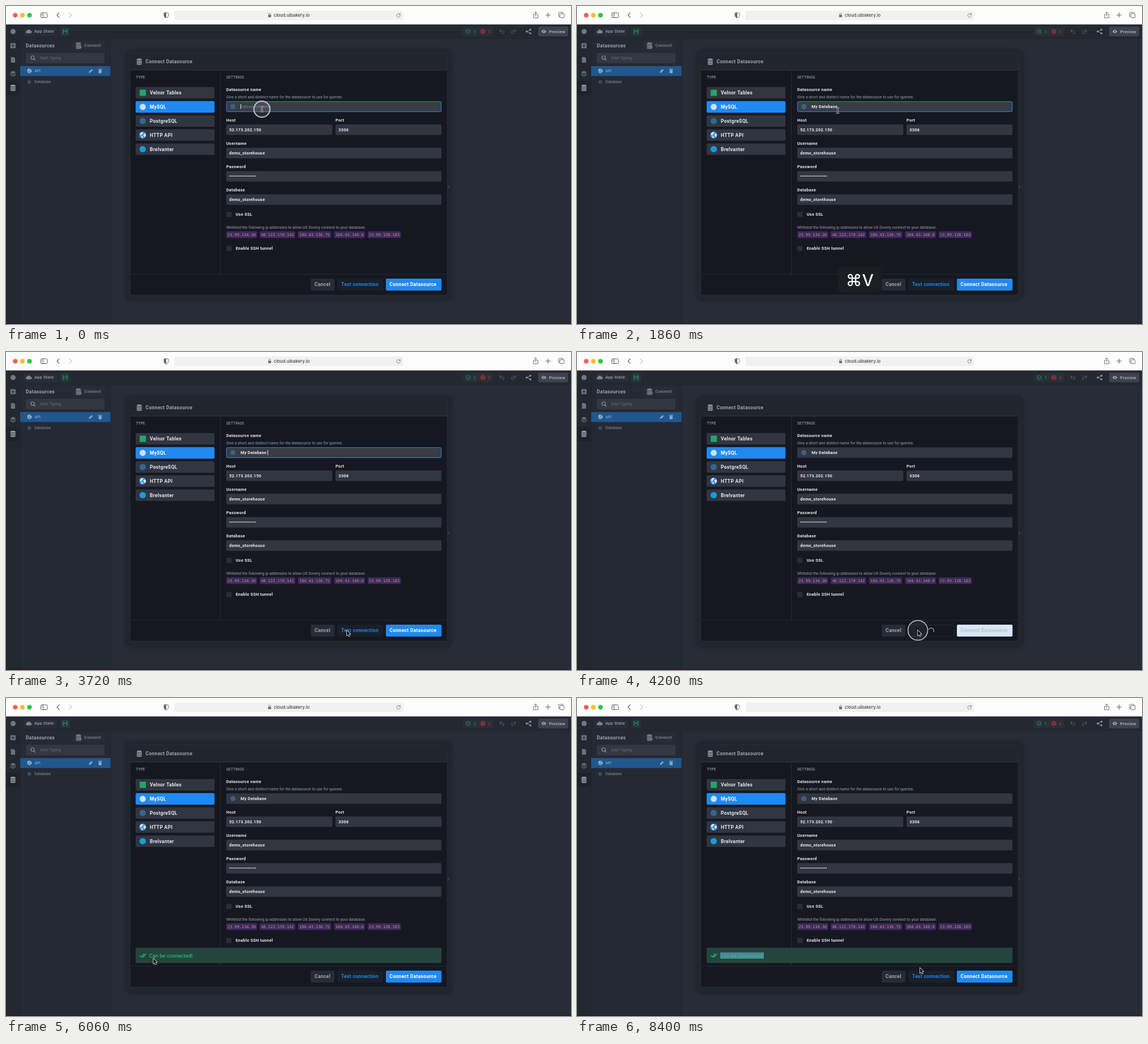
Animation, 998 px wide and 561 px high, one loop 8.43 s. Source, as an HTML page with a canvas:

```html
<!DOCTYPE html>
<html lang="en">
<head>
<meta charset="utf-8">
<title>Connect Datasource</title>
<style>
html, body { margin: 0; width: 100%; height: 100%; overflow: hidden; background: #262a34; }
canvas { display: block; width: 998px; height: 561px; }
</style>
</head>
<body>
<canvas id="stage"></canvas>
<script>
const W = 998, H = 561, LOOP = 8430;
const canvas = document.getElementById('stage');
const ctx = canvas.getContext('2d');
const dpr = window.devicePixelRatio || 1;
canvas.width = W * dpr;
canvas.height = H * dpr;

const UI = 'Roboto, sans-serif', MONO = '"DejaVu Sans Mono", monospace', SANS = 'Inter, sans-serif';
const BLUE = '#2089f3', FIELD = '#323641', WHITE = '#f0f2f5';

// event times in ms
const PASTE = 1300, KEY_OUT = 2350, BLUR = 3950, LOAD = 4100, DONE = 5000;
const DRAG = 6250, DROP = 6940;
const CLICKS = [[-200, 60], [BLUR, LOAD], [DRAG, DROP]];
const PATH = [
  [0, 452, 182], [600, 452, 182], [1300, 459, 184], [1860, 460.5, 184.5], [2150, 460.5, 184.5],
  [2850, 514.3, 409], [3500, 602, 491], [5000, 602, 491], [5850, 260.3, 459.5], [6060, 260.3, 459.5],
  [DRAG, 253, 454], [6800, 347.5, 453.5], [7050, 347.5, 453.5], [8150, 605.7, 476], [LOOP, 605.7, 476]
];

const clamp = v => Math.max(0, Math.min(1, v));
const smooth = v => v * v * (3 - 2 * v);

function box(x, y, w, h, r, fill, stroke, lw = 1) {
  ctx.beginPath();
  ctx.roundRect(x, y, w, h, r);
  if (fill) { ctx.fillStyle = fill; ctx.fill(); }
  if (stroke) { ctx.strokeStyle = stroke; ctx.lineWidth = lw; ctx.stroke(); }
}

function dot(x, y, r, fill, stroke, lw = 1) {
  ctx.beginPath();
  ctx.arc(x, y, r, 0, Math.PI * 2);
  if (fill) { ctx.fillStyle = fill; ctx.fill(); }
  if (stroke) { ctx.strokeStyle = stroke; ctx.lineWidth = lw; ctx.stroke(); }
}

// y is the middle of the capitals
function text(s, x, y, size, color, weight = 400, gap = 0, font = UI) {
  ctx.font = `${weight} ${size}px ${font}`;
  ctx.letterSpacing = gap + 'px';
  ctx.fillStyle = color;
  ctx.fillText(s, x, y + size * 0.355);
}
const small = (s, x, y, color) => text(s, x, y, 6.83, color);
const label = (s, x, y, color = '#e6e8ec') => text(s, x, y, 7.4, color, 700, 0.26);
const large = (s, x, y, color) => text(s, x, y, 8.53, color, 700, 0.3);

function icon(d, x, y, color, lw = 0) {
  const p = new Path2D(d);
  ctx.save();
  ctx.translate(x, y);
  ctx.lineCap = ctx.lineJoin = 'round';
  if (lw) { ctx.strokeStyle = color; ctx.lineWidth = lw; ctx.stroke(p); }
  else { ctx.fillStyle = color; ctx.fill(p); }
  ctx.restore();
}

const CLOUD = 'M-3 3.2a2.2 2.2 0 0 1-.2-4.4a3.2 3.2 0 0 1 6-.4a2.4 2.4 0 0 1 .4 4.8z';
const band = y => `M-4.5 ${y}a4.5 1.5 0 0 0 9 0v1.9a4.5 1.5 0 0 1-9 0z`;
const STACK = 'M-4.5-3.6a4.5 1.6 0 0 1 9 0a4.5 1.6 0 0 1-9 0z' + band(-2.7) + band(0.1) + band(2.7);
const FILE = 'M-3.6-5h4.8l2.6 2.6v7.4h-7.4z';
const UNDO = 'M-1.5-3.5l-2.5 2.5l2.5 2.5M-4-1h5.2a2.3 2.3 0 0 1 0 4.6h-1';
const REDO = 'M1.5-3.5l2.5 2.5l-2.5 2.5M4-1h-5.2a2.3 2.3 0 0 0 0 4.6h1';

function globe(x, y, r, sea, land) {
  dot(x, y, r, sea);
  ctx.save();
  ctx.translate(x, y);
  ctx.scale(r / 6, r / 6);
  ctx.fillStyle = land;
  ctx.fill(new Path2D('M-4.6-2.6l3-2.6l2.4.6l-.8 2l-2 1l.4 1.6l-2 .6zM1-1l2.8-1.6l1.6 2l-1 3l-1.8.4zM-2.4 1.6l2.6.6l-.4 2.2l-1.6.8z'));
  ctx.restore();
}

function browser() {
  box(0, 0, W, 32.5, 0, '#fdfdfd');
  ['#fc5b57', '#fdbb2d', '#2bc840'].forEach((c, i) => dot(16.3 + i * 12.6, 16.3, 4.1, c));
  box(61.5, 12, 11.5, 8.5, 1.6, null, '#5c5c5e', 1);
  icon('M0 0v8.5M-2.2 2.4h.5M-2.2 4.2h.5', 65.5, 12, '#5c5c5e', 0.9);
  icon('M2-4l-4 4l4 4', 92, 16.2, '#555', 1.2);
  icon('M-2-4l4 4l-4 4', 114, 16.2, '#c4c4c6', 1.2);
  icon('M0-4.7l4 1.3v3.6q0 3.2-4 4.8q-4-1.6-4-4.8v-3.6z', 283, 16.2, '#66676a', 0.9);
  icon('M0-4.7v9.7q-4-1.6-4-4.8v-3.6z', 283, 16.2, '#66676a');
  box(297.5, 8, 404, 17, 4, '#f1f1f1');
  box(463, 15.6, 5.2, 4.2, 0.7, '#6e6e70');
  icon('M-1.5 0v-1.3a1.5 1.5 0 0 1 3 0v1.3', 465.6, 15.4, '#6e6e70', 0.8);
  text('cloud.uibakery.io', 473, 16.6, 7.7, '#434345', 500, 0, SANS);
  icon('M2.9-1.4a3.2 3.2 0 1 0 .3 1.9M.8-1.5h2.2v-2.2', 693.3, 16.6, '#727274', 0.8);
  icon('M-1.8-1h-2.2v6h8v-6h-2.2M0 2v-7.2M-2-3.4l2-2l2 2', 935.7, 15.8, '#5c5c5e', 0.9);
  icon('M-4 0h8M0-4v8', 957.5, 16, '#5c5c5e', 1);
  box(978.3, 13.6, 7.5, 7, 1.2, null, '#5c5c5e', 0.9);
  icon('M-1.8 5.6h-.6a1 1 0 0 1-1-1v-5.6a1 1 0 0 1 1-1h6a1 1 0 0 1 1 1v.6', 979.6, 13.2, '#5c5c5e', 0.9);
}

function topBar() {
  box(0, 32.5, W, 25, 0, '#242831');
  dot(12.5, 45, 4.6, '#727882');
  box(31, 37.5, 59.5, 15.5, 2, '#292d37');
  icon(CLOUD, 40.2, 45, '#7d838e');
  label('App State', 50, 44.8, '#8b919b');
  box(96, 37, 17, 16, 2, '#24343a');
  box(100.2, 40.7, 8.6, 8.6, 1, '#25804f');
  box(102, 41, 4.4, 2.6, 0, '#24343a');
  box(102, 45.4, 5, 3.4, 0, '#24343a');
  box(807, 37, 53.5, 16, 2, '#292f37');
  dot(816.3, 45, 3.7, null, '#1f8a5b', 1);
  icon('M-1.8 0l1.3 1.4l2.6-3', 816.3, 45, '#1f8a5b', 1);
  label('1', 825.8, 45, '#229060');
  dot(842.4, 45, 4.3, '#8f3035');
  icon('M0-2.2v2.4M0 2v.1', 842.4, 45, '#262a33', 1);
  label('0', 851.5, 45, '#8f3035');
  icon(UNDO, 876, 45, '#4d535e', 1.2);
  icon(REDO, 896.5, 45, '#4d535e', 1.2);
  icon('M3-3l-6 3l6 3', 923, 45, '#8a909b', 1);
  dot(926.3, 41.8, 1.7, '#8a909b');
  dot(919.6, 45, 1.7, '#8a909b');
  dot(926.3, 48.2, 1.7, '#8a909b');
  box(940, 36.5, 53, 17, 2, '#3d424e');
  icon('M-4.4 0q4.4-6 8.8 0q-4.4 6-8.8 0z', 950, 45, '#9ca2ac');
  dot(950, 45, 1.2, '#3d424e');
  label('Preview', 959.3, 45, '#a7acb5');
}

function sidebar() {
  box(0, 57.5, 184.5, H - 57.5, 0, '#252933');
  box(0, 57.5, 25, H - 57.5, 0, '#23272f');
  box(0, 132, 25, 25, 0, '#1e222a');
  box(0, 57, W, 0.8, 0, '#1f232b');
  box(24.5, 57.5, 0.8, H, 0, '#1f232b');
  box(184, 57.5, 1, H, 0, '#1f232b');
  box(7.7, 65.5, 9.2, 9, 1.2, '#6c727d');
  icon('M-2.2 0h4.4M0-2.2v4.4', 12.3, 70, '#23272f', 1.2);
  icon(FILE, 12.3, 95, '#6c727d');
  icon('M0-4.6l5 2.3l-5 2.3l-5-2.3z', 12.3, 119.2, '#6c727d');
  icon('M-4.5 0l4.5 2.1l4.5-2.1M-4.5 2.5l4.5 2.1l4.5-2.1', 12.3, 119.3, '#6c727d', 1.1);
  icon(STACK, 12.3, 144, '#9298a3');

  large('Datasources', 35, 69.8, '#9ba0aa');
  box(116, 61.5, 58, 16, 2, '#282c36');
  icon(STACK, 128, 69.5, '#7b818c');
  icon('M-2.2 0h4.4M0-2.2v4.4', 131.5, 72.5, '#7b818c', 1.2);
  label('Connect', 138.3, 69.6, '#747a85');
  box(35, 82.5, 139, 18.5, 2, '#323742');
  dot(47, 91, 3, null, '#9298a2', 1.1);
  icon('M0 0l2.2 2.2', 49.2, 93.3, '#9298a2', 1.2);
  small('Start Typing', 60.3, 91.2, '#676d78');
  box(25, 106, 159.5, 17.5, 0, '#20578d');
  globe(41.3, 114.5, 4.3, '#5d87b0', '#a9bfd4');
  small('API', 50.3, 114.2, '#a2b6cb');
  icon('M-3.4 3.4l.5-2.5l4.2-4.2l2 2l-4.2 4.2z', 149.8, 114.6, '#8fa9c3');
  box(163.5, 112.4, 5.4, 6, 0.7, '#8fa9c3');
  box(162.6, 110.8, 7.2, 1, 0.3, '#8fa9c3');
  dot(41, 134, 3.2, '#3a4c60');
  small('Database', 50.3, 134, '#868c97');
}

function field(x, y, w, value) {
  box(x, y, w, 18.6, 2, FIELD);
  if (value) label(value, x + 5.2, y + 9, '#eceef1');
}

function modal() {
  ctx.save();
  ctx.shadowColor = '#21252e';
  ctx.shadowBlur = 5 * dpr;
  box(209.5, 76, 580, 446, 14, '#21252e');
  ctx.restore();
  small('s.', 779.5, 318.5, '#4c525d');
  box(219, 82.5, 560.5, 427.5, 2, '#151820', '#2c303b', 0.8);
  box(219.4, 83, 559.8, 30, [2, 2, 0, 0], '#21252e');
  box(219, 112.6, 560.5, 0.9, 0, '#343844');
  box(378.2, 113, 0.9, 360, 0, '#2c303a');
  box(219, 472.7, 560.5, 0.9, 0, '#2c303a');
  icon(STACK, 235.4, 97.7, '#9297a2');
  large('Connect Datasource', 246.5, 97.6, '#a0a5ae');
  small('TYPE', 229.2, 125.6, '#a9aeb6');
  small('SETTINGS', 389, 125.6, '#a9aeb6');

  ['Velnor Tables', 'MySQL', 'PostgreSQL', 'HTTP API', 'Brelvanter'].forEach((name, i) => {
    const y = 143 + i * 24.85;
    box(229, y, 139.3, 20.3, 2, i === 1 ? BLUE : '#313540');
    large(name, 254, y + 10.1, i === 1 ? '#fff' : '#e4e6ea');
  });
  box(236.2, 147.6, 11, 11, 0, '#23a566');
  dot(241.5, 178, 5.4, '#cfe2f4');
  dot(241.5, 202.9, 5.6, '#336791');
  globe(241.5, 227.7, 6.2, '#3e97de', '#e3f0fa');
  dot(241.5, 252.5, 5.6, '#169bdc');

  label('Datasource name', 389, 147.8);
  small('Give a short and distinct name for the datasource to use for queries.', 389, 160.2, '#989da6');
  label('Host', 389, 201.2);
  label('Port', 582, 201.2);
  field(389, 209, 187.4, '52.173.202.150');
  field(582, 209, 187.2, '3306');
  label('Username', 389, 242.3);
  field(389, 250.1, 380.2, 'demo_storehouse');
  label('Password', 389, 283.3);
  field(389, 291.2, 380.2);
  for (let i = 0; i < 16; i++) dot(395.6 + i * 2.97, 300, 0.95, '#eceef1');
  label('Database', 389, 324.4);
  field(389, 332.2, 380.2, 'demo_storehouse');

  box(389.2, 363, 9.2, 9.2, 1, '#292d37');
  label('Use SSL', 405.7, 367.5);
  small('Whitelist the following ip addresses to allow UX Dovery connect to your database.', 389, 390.2, '#989da6');
  [[389, '23.99.134.30'], [448, '40.122.170.142'], [515.6, '104.43.136.75'],
   [579.5, '104.43.140.0'], [638.7, '23.99.128.183']].forEach(([x, ip]) => {
    box(x, 397.4, ip.length * 4.15 + 4.8, 11.8, 2, '#3d2a60');
    text(ip, x + 2.4, 403.4, 6.9, '#cd8e70', 400, 0, MONO);
  });
  box(389.2, 423.2, 9.2, 9.2, 1, '#292d37');
  label('Enable SSH tunnel', 405.7, 427.7);
}

function nameField(t) {
  const focus = t < BLUR;
  box(389, 168.2, 380.2, 18.6, 2, focus ? '#373c47' : FIELD);
  if (focus) box(389.4, 168.6, 379.4, 17.8, 2, null, '#2c82dc', 1);
  dot(400.7, 177.4, 4.6, '#3c5f86');
  if (t >= PASTE) label('My Database', 414.3, 177.2, '#eceef1');
  else small('Datasource name', 414.3, 177.4, '#7b818c');
  const since = t < PASTE ? t : t - PASTE;
  if (focus && since % 1000 < 500) box(t < PASTE ? 414.2 : 462, 173, 0.9, 8.6, 0, WHITE);
}

function footer(t) {
  box(538.3, 481, 42, 21, 2, '#272b35');
  large('Cancel', 545, 491.4, '#a1a6b0');
  if (t >= LOAD && t < DONE) {
    box(585.7, 481.4, 79.8, 20.2, 2, '#14171f', '#282c36', 0.9);
    const a = (t - 4200) / 1000 * Math.PI * 2;
    ctx.beginPath();
    ctx.arc(625.6, 491.7, 4.7, a - 2.8, a + 0.5);
    ctx.strokeStyle = '#9aa0aa';
    ctx.lineWidth = 1.3;
    ctx.stroke();
    box(671, 481, 98.3, 21, 2, '#d8e6f6');
    large('Connect Datasource', 677.5, 491.4, '#b3c3d5');
  } else {
    box(585.3, 481, 80.6, 21, 2, '#1a1f29');
    large('Test connection', 592, 491.4, '#1f86ea');
    box(671, 481, 98.3, 21, 2, BLUE);
    large('Connect Datasource', 677.5, 491.4, '#fff');
  }
}

function success(t, pos) {
  if (t < DONE) return;
  box(229, 440.6, 540.3, 27, 2, '#24453c');
  icon('M-4.6.4l2.4 2.6l4.4-5.6M.4 2.6l.4.4l4.4-5.6', 241.4, 454.2, '#1fd592', 1.2);
  const sel = t < DRAG ? 0 : clamp((pos.x - 253) / 77);
  const end = t > 6800 ? 1 : sel;
  const msg = color => text('Can be connected!', 253, 454.3, 9.1, color, 400, 0.1);
  msg('#1fd592');
  if (!end) return;
  ctx.save();
  ctx.beginPath();
  ctx.rect(253, 448.4, 77.2 * end, 11.6);
  ctx.clip();
  box(253, 448.4, 77.2, 11.6, 0, '#4e8492');
  msg('#2cc0a0');
  ctx.restore();
}

function keys(t) {
  const a = clamp((t - PASTE + 60) / 60) * (1 - clamp((t - KEY_OUT) / 250));
  if (!a) return;
  ctx.save();
  ctx.globalAlpha = a;
  box(461, 460, 76.5, 45, 8, 'rgba(29,31,36,0.96)');
  ctx.textAlign = 'center';
  text('⌘V', 499.5, 483.5, 29, '#f2f2f3', 500, 0, 'Inter, "DejaVu Sans", sans-serif');
  ctx.restore();
}

function place(t) {
  let i = 1;
  while (i < PATH.length - 1 && t > PATH[i][0]) i++;
  const [t0, x0, y0] = PATH[i - 1], [t1, x1, y1] = PATH[i];
  const k = smooth(clamp((t - t0) / (t1 - t0)));
  return { x: x0 + (x1 - x0) * k, y: y0 + (y1 - y0) * k };
}

function rings(t, { x, y }) {
  for (const [down, up] of CLICKS) {
    if (t < down || t > up + 250) continue;
    const p = clamp((t - up) / 250), grow = clamp((t - down) / 120);
    ctx.save();
    ctx.globalAlpha = grow * (1 - p ** 4);
    dot(x, y, 14.2 + 5 * (1 - (1 - p) ** 2), `rgba(150,155,165,${0.16 * (1 - p)})`,
      'rgba(205,209,214,0.85)', 2.2 - 1.2 * p);
    ctx.restore();
  }
}

function pointer(t, { x, y }) {
  const inField = y > 168 && y < 187;
  const onText = t > DONE && y > 447 && y < 458.5 && x > 250 && x < 350;
  if (inField || onText) {
    const bar = 'M-1.9-4.6q1.6 0 1.9 1q.3-1 1.9-1M0-3.6v7.2M-1.9 4.6q1.6 0 1.9-1q.3 1 1.9 1M-1 .9h2';
    icon(bar, x, y, 'rgba(255,255,255,0.85)', 1.9);
    icon(bar, x, y, '#111', 0.8);
  } else {
    const arrow = 'M0 0v9.2l2.1-2l1.4 3.2l1.5-.7l-1.4-3.1h2.9z';
    icon(arrow, x, y, '#f4f4f4', 1.5);
    icon(arrow, x, y, '#0b0b0c');
  }
}

function draw(t) {
  const pos = place(t);
  ctx.setTransform(dpr, 0, 0, dpr, 0, 0);
  box(0, 0, W, H, 0, '#282c36');
  topBar();
  sidebar();
  browser();
  modal();
  nameField(t);
  footer(t);
  success(t, pos);
  keys(t);
  rings(t, pos);
  pointer(t, pos);
  box(0, 560, W, 1, 0, '#15181e');
}

const start = performance.now();
function tick() {
  draw((performance.now() - start) % LOOP);
  requestAnimationFrame(tick);
}
tick();
</script>
</body>
</html>
```
